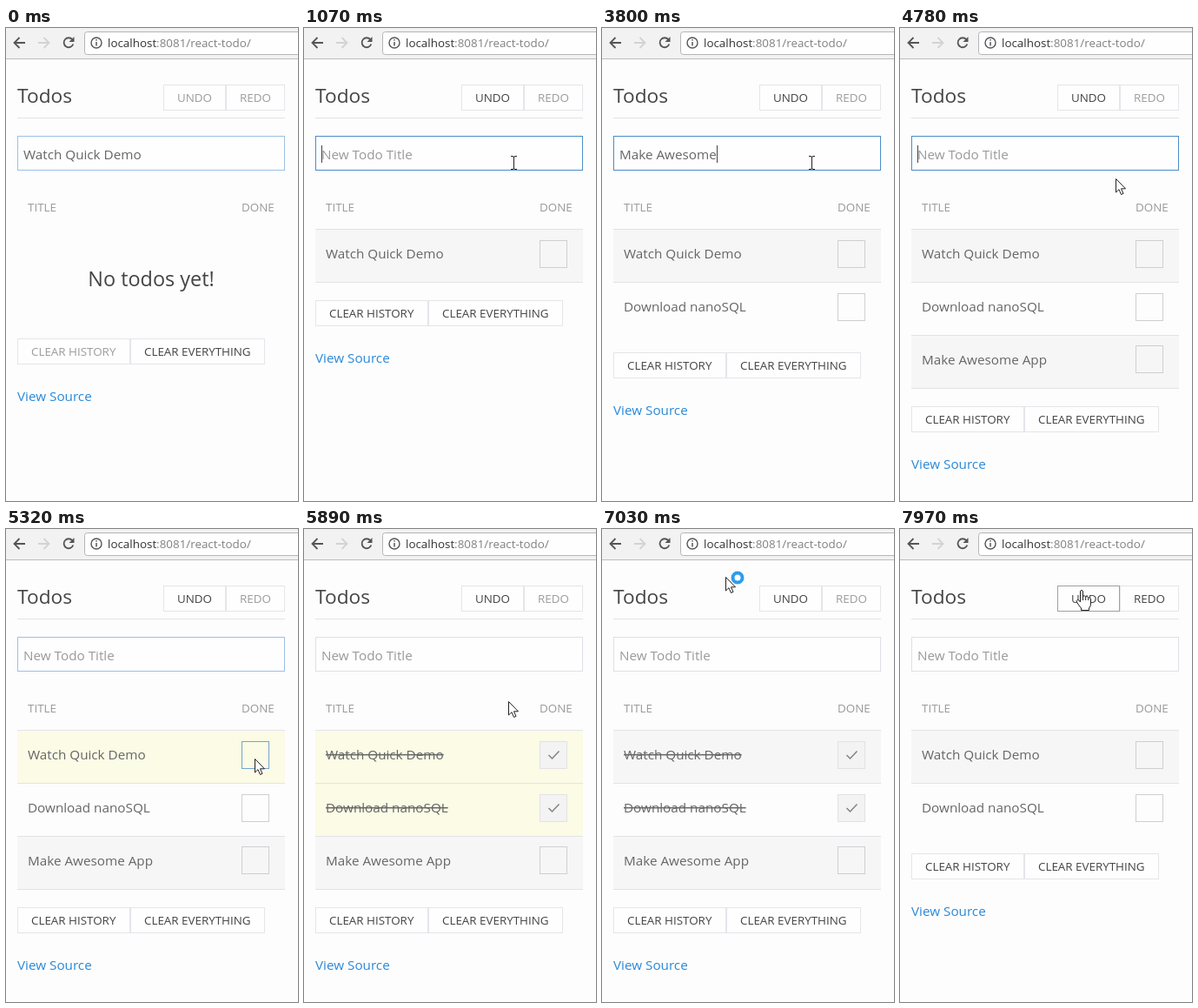
Recreate the animation shown at these times as an HTML page. Size 336 by 544 pixels, loop 7.99 s.

```html
<!DOCTYPE html>
<html lang="en">
<head>
<meta charset="utf-8">
<title>Todos</title>
<style>
  html, body { margin: 0; width: 100%; height: 100%; overflow: hidden; background: #fdfdfd; }
  svg { display: block; width: 100%; height: 100%; }
  text { font: 15.25px "Open Sans", "Noto Sans", sans-serif; fill: #666; white-space: pre; }
  .small { font-size: 13.4px; }
  .big { fill: #444; }
  .faint { fill: #999; }
  .btn rect { fill: #fefefe; stroke: #e5e5ea; }
  .btn text { font-size: 13.4px; fill: #444; }
  .btn.off text { fill: #9c9c9c; }
  .btn.hot rect { stroke: #a0a0a4; }
  .rule { stroke: #e3e3e8; }
  .stroke { fill: none; stroke: #555; stroke-width: 1.8; }
  .field { fill: #fefefe; stroke: #dfdfe6; }
  .field.warm { stroke: #9cc0e6; }
  .field.focus { stroke: #4a8cc8; }
  .box { fill: none; stroke: #cfcfd2; }
  .row.done .box { fill: #f3f3f3; stroke: #e2e2e6; }
  .row.focus .box { stroke: #74a4d0; }
  .row .tick { fill: none; stroke: #808080; stroke-width: 1.4; visibility: hidden; }
  .row.done .tick { visibility: inherit; }
  .row.done text { text-decoration: line-through; }
  .row .fill { fill: none; }
  .row.odd .fill { fill: #f6f6f6; }
  .row.lit .fill { fill: #fbfbe6; }
  .pointer { fill: #fff; stroke: #222; stroke-width: 1; stroke-linejoin: round; }
  .beam { fill: none; stroke: #222; }
</style>
</head>
<body>
<svg viewBox="0 0 336 544">
  <rect width="336" height="544" fill="#fdfdfd"/>

  <g id="toolbar">
    <rect width="336" height="35" fill="#f2f2f2"/>
    <path d="M0 35.5H336" stroke="#bcbcbc"/>
    <path class="stroke" d="M22 17H10M15.5 11L9.5 17L15.5 23"/>
    <path class="stroke" style="stroke:#d3d3d3" d="M37 17H49M43.5 11L49.5 17L43.5 23"/>
    <path class="stroke" d="M76.3 13.2A5.5 5.5 0 1 0 77.3 18.5"/>
    <path fill="#555" d="M78.5 10V16H72.5Z"/>
    <path d="M336 4.5H93.5Q90.5 4.5 90.5 7.5V27.5Q90.5 30.5 93.5 30.5H336" fill="#fefefe" stroke="#b4b4ba"/>
    <circle cx="104" cy="17" r="6" class="stroke" style="stroke-width:1.4"/>
    <path d="M104 16V20.5M104 13V14.6" class="stroke" style="stroke-width:1.5"/>
    <text class="small" x="117" y="22" style="fill:#333">localhost<tspan fill="#808080">:8081/react-todo/</tspan></text>
  </g>

  <g id="page">
    <text class="big" x="13" y="86" style="font-size:22.7px">Todos</text>
    <g id="undo" class="btn"><rect x="181.5" y="65.5" width="71" height="29"/><text x="197" y="85">UNDO</text></g>
    <g id="redo" class="btn"><rect x="253.5" y="65.5" width="67" height="29"/><text x="269" y="85">REDO</text></g>
    <path class="rule" d="M13 103.5H321"/>

    <rect id="field" x="13.5" y="124.5" width="307" height="39"/>
    <text id="entry" x="20" y="151"></text>
    <path id="caret" d="M.5 135V155" stroke="#444"/>

    <text class="small faint" x="25" y="211">TITLE</text>
    <text class="small faint" x="271" y="211">DONE</text>
    <text id="empty" class="big" x="167" y="297" text-anchor="middle" style="font-size:23.4px">No todos yet!</text>
    <g id="rows"></g>

    <g id="foot">
      <g id="clear" class="btn"><rect x="13.5" y=".5" width="129" height="29"/><text x="29" y="20">CLEAR HISTORY</text></g>
      <g class="btn"><rect x="143.5" y=".5" width="154" height="29"/><text x="159" y="20">CLEAR EVERYTHING</text></g>
      <text x="13" y="72" style="fill:#2a88d8">View Source</text>
    </g>
  </g>

  <g id="cursor">
    <path id="arrow" class="pointer" d="M.5 .5V16L4 12.7L6.5 18.5L9 17.4L6.5 11.8H11.5Z"/>
    <path id="beam" class="beam" d="M-3 -7.5H-1Q.5 -7.5 .5 -6V6Q.5 7.5 -1 7.5H-3M4 -7.5H2Q.5 -7.5 .5 -6V6Q.5 7.5 2 7.5H4"/>
    <g id="hand">
      <path class="pointer" d="M-1.5 14V2Q-1.5 .5 0 .5T1.5 2V8Q1.8 6.5 3.3 6.8T4.7 8.5Q5 7.3 6.5 7.7T7.7 9.5Q8.2 8.6 9.4 9.2T10.5 11V16Q10.5 19 8.5 21V23.5H-.5V21Q-3 18.5 -5.5 14Q-6.5 12 -5 11.5T-1.5 14Z"/>
      <path class="beam" d="M1.5 8V12M4.7 8.5V12M7.7 9.5V12"/>
    </g>
    <circle id="busy" cx="14" cy="1" r="5.5" fill="#fefefe" stroke="#2c9cec" stroke-width="4"/>
  </g>
</svg>

<script>
const LOOP = 7990;
const $ = id => document.getElementById(id);
const show = (el, on) => el.style.visibility = on ? 'inherit' : 'hidden';
const within = (t, [from, to]) => t >= from && t < to;

const FOCUS = 740, BLUR = 5290;
const RELOAD = [6600, 6680], BUSY = [6540, 7160];
const UNDO_HOVER = 7260, FIRST_UNDO = 7400;

// Text in the field: typing starts at `from`, is complete at `full`, is added at `enter`
const entries = [
  { text: 'Watch Quick Demo', from: -2, full: -1, enter: 900 },
  { text: 'Download nanoSQL', from: 1380, full: 2330, enter: 2480 },
  { text: 'Make Awesome App', from: 3170, full: 3990, enter: 4300 }
];

const todos = [
  { y: 231, h: 62, live: [900, LOOP], done: [5360, 7610], lit: [5040, 5930], focus: [5290, 5610] },
  { y: 293, h: 60, live: [2480, LOOP], done: [5640, 7400], lit: [5480, 5930], focus: [5610, 5700] },
  { y: 353, h: 62, live: [4300, 7850], done: [LOOP, LOOP], lit: [LOOP, LOOP], focus: [LOOP, LOOP] }
];
const footTop = [357, 313, 373, 435];

// Pointer stops: time, x, y
const path = [
  [400, 340, 146], [720, 241, 155], [4620, 241, 155], [5250, 286, 264],
  [5400, 286, 265], [5580, 287, 322], [5690, 287, 323], [5890, 235, 198],
  [6210, 136, 34], [6430, 72, 17], [6700, 74, 18], [7030, 142, 55],
  [7300, 209, 70], [LOOP, 209, 70]
];

$('rows').innerHTML = todos.map(({ y, h }, i) => {
  const odd = i % 2 === 0, box = Math.round(244 + 60.5 * i);
  return `<g class="row">
    <rect class="fill" x="13" y="${y}" width="308" height="${h}"/>
    ${odd ? `<path class="rule" d="M13 ${y + .5}H321M13 ${y + h - .5}H321"/>` : ''}
    <text x="25" y="${265 + 61 * i}">${entries[i].text}</text>
    <rect class="box" x="271.5" y="${box + .5}" width="31" height="31"/>
    <path class="tick" d="M281.5 ${box + 16}l4 4l8 -8.5"/>
  </g>`;
}).join('');
const rows = [...$('rows').children];

function typed(t) {
  const e = entries.find(e => t < e.enter);
  if (!e || t < e.from) return '';
  const part = Math.min(1, (t - e.from) / (e.full - e.from));
  return e.text.slice(0, 1 + Math.floor(part * (e.text.length - 1)));
}

function pointerAt(t) {
  const i = path.findIndex(p => t < p[0]);
  if (i < 1) return path[0].slice(1);
  const [t0, x0, y0] = path[i - 1], [t1, x1, y1] = path[i];
  const u = (t - t0) / (t1 - t0), k = u * u * (3 - 2 * u);
  return [x0 + (x1 - x0) * k, y0 + (y1 - y0) * k];
}

function drawField(t) {
  const text = typed(t), focused = within(t, [FOCUS, BLUR]);
  const warm = t < FOCUS || within(t, [BLUR, BLUR + 150]);
  $('field').setAttribute('class', 'field' + (focused ? ' focus' : warm ? ' warm' : ''));
  $('entry').textContent = text || 'New Todo Title';
  $('entry').setAttribute('class', text ? '' : 'faint');
  const x = text ? Math.round($('entry').getComputedTextLength()) : 0;
  $('caret').setAttribute('transform', `translate(${20 + x})`);
  show($('caret'), focused);
}

function drawList(t) {
  let count = 0;
  todos.forEach((todo, i) => {
    const live = within(t, todo.live);
    count += live;
    show(rows[i], live);
    const flags = ['done', 'lit', 'focus'].filter(name => within(t, todo[name]));
    rows[i].setAttribute('class', ['row', i % 2 ? '' : 'odd', ...flags].join(' '));
  });
  show($('empty'), !count);
  $('foot').setAttribute('transform', `translate(0 ${footTop[count]})`);
  $('clear').classList.toggle('off', !count);
  $('undo').classList.toggle('off', !count);
  $('undo').classList.toggle('hot', t >= UNDO_HOVER);
  $('redo').classList.toggle('off', t < FIRST_UNDO);
}

function drawPointer(t) {
  const [x, y] = pointerAt(t).map(Math.round);
  const beam = x > 13 && x < 321 && y > 124 && y < 164;
  const hand = t >= UNDO_HOVER;
  $('cursor').setAttribute('transform', `translate(${x} ${y})`);
  show($('cursor'), t >= path[0][0]);
  show($('beam'), beam);
  show($('hand'), hand);
  show($('arrow'), !beam && !hand);
  show($('busy'), within(t, BUSY));
}

function draw(now) {
  const t = now % LOOP;
  show($('page'), !within(t, RELOAD));
  drawField(t);
  drawList(t);
  drawPointer(t);
}

const start = performance.now();
function tick() {
  draw(performance.now() - start);
  requestAnimationFrame(tick);
}
tick();
</script>
</body>
</html>
```
